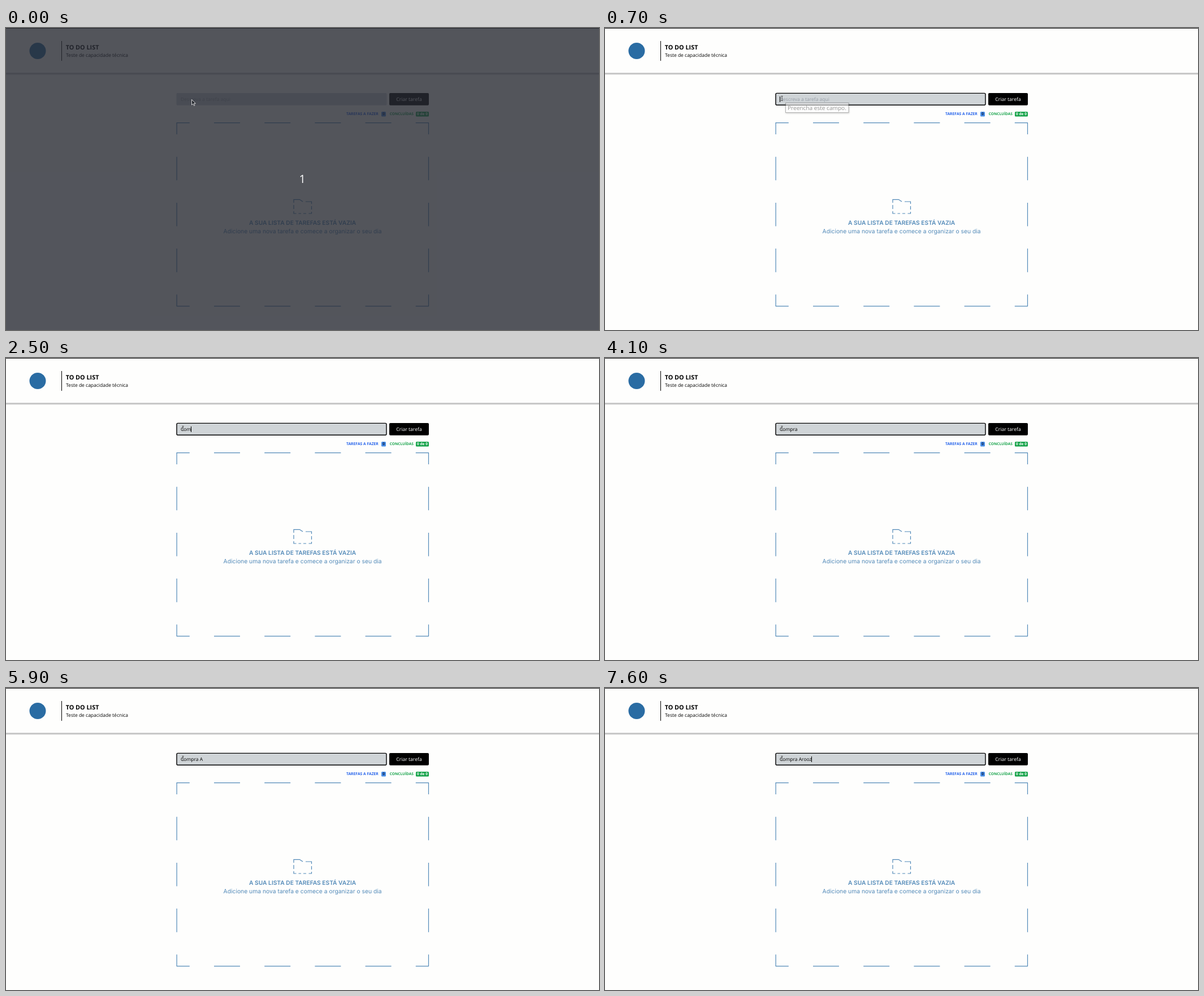
These frames come from a looping animation (1049x534 px, 8 s). An HTML page:

```html
<!DOCTYPE html>
<html lang="pt-BR">
<head>
<meta charset="utf-8">
<title>To do list</title>
<style>
  html, body { margin: 0; width: 100%; height: 100%; overflow: hidden; background: #fefefd; }
  svg { display: block; width: 100%; height: 100%; }
  text { font: 8.5px "Open Sans", "Noto Sans", sans-serif; white-space: pre; text-rendering: geometricPrecision; }
  .title { font-size: 10.8px; font-weight: 700; }
  .button { font-size: 8.65px; fill: #fff; }
  .label { font-size: 6.75px; font-weight: 700; }
  .small { font-size: 6.5px; font-weight: 700; }
  .middle { text-anchor: middle; }
  .empty { font-family: Inter, sans-serif; font-size: 10.33px; fill: #548bb9; text-anchor: middle; }
  .strong { font-size: 10.25px; font-weight: 600; }
  .tip { font-size: 10.1px; fill: #2b2b2b; }
  .count { font-size: 20px; fill: #fff; text-anchor: middle; }
  .outline { fill: none; stroke: #5189b8; stroke-width: 1.2; }
  .across { stroke-dasharray: 46 43.2; stroke-dashoffset: 23; }
  .down { stroke-dasharray: 41.6 39.6; stroke-dashoffset: 20.8; }
</style>
</head>
<body>
<svg viewBox="0 0 1049 534">
  <defs>
    <linearGradient id="shade" x2="0" y2="1">
      <stop stop-color="#a9a9a9"/>
      <stop offset=".4" stop-color="#c9c9c9"/>
      <stop offset="1" stop-color="#fefefd"/>
    </linearGradient>
    <filter id="soft" x="-10%" y="-50%" width="120%" height="200%">
      <feGaussianBlur stdDeviation="1.4"/>
    </filter>
  </defs>

  <rect width="1049" height="534" fill="#fefefd"/>
  <rect width="1049" height="1" fill="#1c1c1c"/>
  <rect y="79.5" width="1049" height="4" fill="url(#shade)"/>

  <circle cx="56" cy="40.5" r="14.5" fill="#2a6ca3"/>
  <rect x="98" y="23" width="1" height="35"/>
  <text class="title" x="105.7" y="37.8">TO DO LIST</text>
  <text x="106" y="51.2">Teste de capacidade técnica</text>

  <rect x="301.5" y="115" width="372" height="21.7" rx="2" fill="#cfd4d7"/>
  <rect id="ring" x="302" y="115.4" width="371" height="20.8" rx="2" fill="none" stroke="#000" stroke-width="1.4"/>
  <text id="hint" x="308.9" y="129" fill="#979ea7">Descreva a tarefa aqui</text>
  <text id="entry" x="308.9" y="129"></text>
  <rect id="caret" y="121" width="1" height="10"/>
  <rect x="678" y="115" width="70" height="21.7" rx="2"/>
  <text class="button middle" x="713" y="129">Criar tarefa</text>

  <text class="label" x="602" y="154.4" fill="#2563eb">TAREFAS A FAZER</text>
  <rect x="664" y="148" width="8" height="8.6" rx="1.5" fill="#4a8fe8"/>
  <text class="small middle" x="668" y="154.4" fill="#0b1f45">0</text>
  <text class="small" x="678.8" y="154.4" fill="#16a34a">CONCLUÍDAS</text>
  <rect x="725" y="148" width="23" height="8.6" rx="1.5" fill="#16a34a"/>
  <text class="small middle" x="736.5" y="154.4" fill="#fff">0 de 0</text>

  <path class="outline across" d="M301.8 167.6H747.8M301.8 491.9H747.8"/>
  <path class="outline down" d="M302.1 167.3V492.1M747.5 167.3V492.1"/>
  <path class="outline" d="M509 309V303.3H519.5L525 307M530 307H540.5V311M540.5 315V321M540.5 325V328H535.5M531 328H526M522 328H517.5M513.5 328H509V324M509 320V313"/>
  <text class="empty strong" x="524.6" y="348">A SUA LISTA DE TAREFAS ESTÁ VAZIA</text>
  <text class="empty" x="524.6" y="363.1">Adicione uma nova tarefa e comece a organizar o seu dia</text>

  <g id="tooltip">
    <rect x="319.5" y="133.5" width="112.5" height="17.5" fill="#000" opacity=".4" filter="url(#soft)"/>
    <rect x="319.5" y="132.5" width="111.5" height="17" fill="#fdfdfd" stroke="#666"/>
    <text class="tip" x="323" y="144.6">Preencha este campo.</text>
  </g>

  <path id="beam" d="M-1.6 -4H1.6M0 -4V4M-1.6 4H1.6" fill="none" stroke="#444" stroke-width=".9"/>

  <g id="veil">
    <rect width="1049" height="534" fill="#282b34" fill-opacity=".8"/>
    <text class="count" x="524.3" y="274">1</text>
    <path d="M328.5 126.5V136L330.8 134L332.5 137.4L334 136.6L332.4 133.4H335.3Z" fill="#22252b" stroke="#e4e4e4" stroke-width=".9"/>
  </g>
</svg>
<script>
  const LOOP = 8000;
  const part = id => document.getElementById(id);
  const [ring, hint, entry, caret, tooltip, beam, veil] =
    ["ring", "hint", "entry", "caret", "tooltip", "beam", "veil"].map(part);

  // Each step lists only what changes at that time.
  const steps = [
    [0, { veil: true, focus: false, caret: false, tip: 0, text: "", pointer: "328 127.8" }],
    [100, { veil: false }],
    [500, { focus: true, caret: true }],
    [700, { pointer: "313 124.5", tip: 0.5 }],
    [800, { tip: 1 }],
    [1100, { caret: false }],
    [1600, { caret: true }],
    [1700, { text: "C", tip: 0.5 }],
    [1800, { tip: 0 }],
    [2300, { text: "Co" }],
    [2500, { text: "Com" }],
    [3100, { text: "Comp" }],
    [3400, { text: "Compr" }],
    [3500, { text: "Compra" }],
    [4100, { caret: false }],
    [4600, { text: "Compra ", caret: true }],
    [5200, { caret: false }],
    [5300, { text: "Compra A", caret: true }],
    [5900, { caret: false }],
    [6500, { caret: true }],
    [7000, { text: "Compra Ar" }],
    [7100, { text: "Compra Aro" }],
    [7200, { text: "Compra Aroo" }],
    [7600, { text: "Compra Arooz" }]
  ];

  const show = (node, visible) => node.setAttribute("visibility", visible ? "visible" : "hidden");

  function draw(time) {
    const state = Object.assign({}, ...steps.filter(([at]) => at <= time).map(([, change]) => change));
    show(veil, state.veil);
    show(beam, !state.veil);
    show(ring, state.focus);
    show(hint, !state.text);
    show(caret, state.caret);
    tooltip.setAttribute("opacity", state.tip);
    beam.setAttribute("transform", `translate(${state.pointer})`);
    entry.textContent = state.text;
    const width = state.text ? entry.getComputedTextLength() : 0;
    caret.setAttribute("x", Math.floor(309 + width));
  }

  const start = performance.now();
  function tick() {
    draw((performance.now() - start) % LOOP);
    requestAnimationFrame(tick);
  }
  tick();
</script>
</body>
</html>
```
